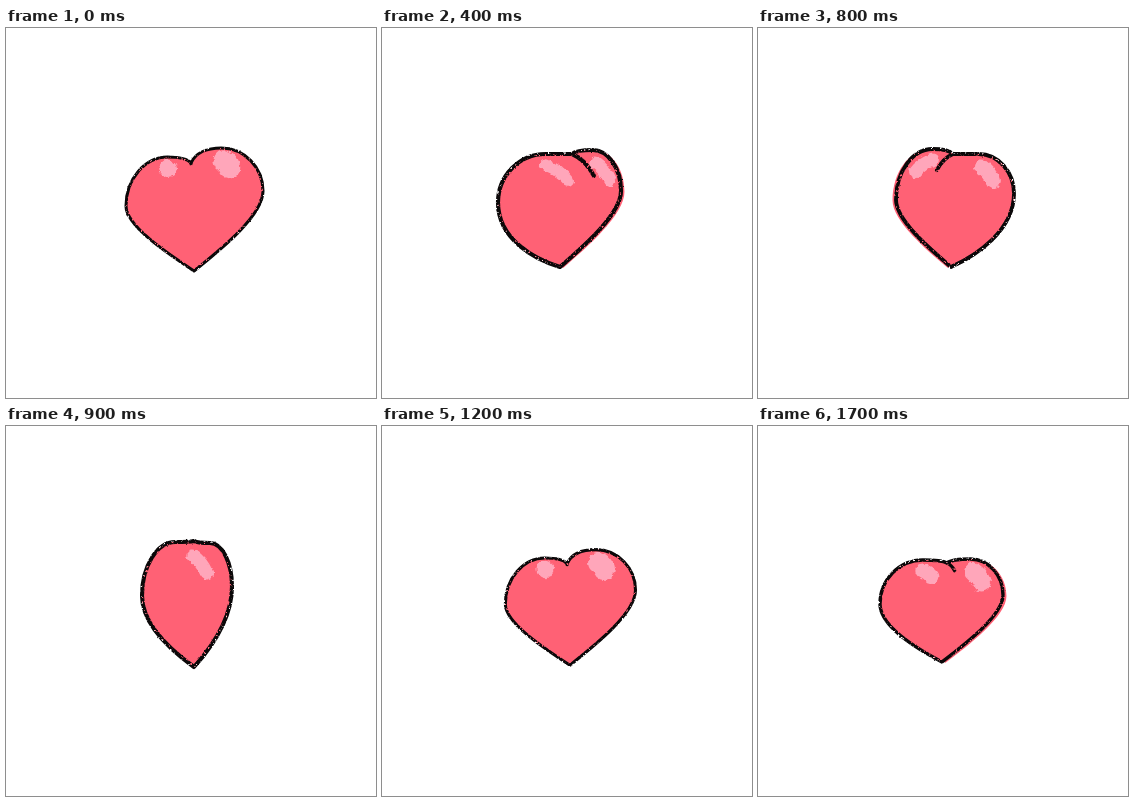
Write an HTML page that moves like this. It is 370 px wide and 370 px high and loops after 1.8 s.

```html
<!DOCTYPE html>
<html lang="en">
<head>
<meta charset="utf-8">
<title>Turning heart</title>
<style>
html, body { margin: 0; width: 100%; height: 100%; overflow: hidden; background: #fff; }
svg { display: block; width: 100vw; height: 100vh; }
path { stroke-linecap: round; stroke-linejoin: round; }
</style>
</head>
<body>
<svg viewBox="0 0 370 370">
  <defs>
    <clipPath id="inside"><path id="clip"/></clipPath>
    <filter id="ink" filterUnits="userSpaceOnUse" x="0" y="0" width="370" height="370" color-interpolation-filters="sRGB">
      <feTurbulence class="noise" type="fractalNoise" baseFrequency=".45" numOctaves="2" result="n"/>
      <feDisplacementMap in="SourceGraphic" in2="n" scale="1.8" xChannelSelector="R" yChannelSelector="G" result="d"/>
      <feColorMatrix in="n" values="0 0 0 0 0  0 0 0 0 0  0 0 0 0 0  0 0 0 7 -1.8" result="g"/>
      <feComposite in="d" in2="g" operator="in"/>
    </filter>
    <filter id="chalk" filterUnits="userSpaceOnUse" x="0" y="0" width="370" height="370" color-interpolation-filters="sRGB">
      <feTurbulence class="noise" type="fractalNoise" baseFrequency=".2" numOctaves="2" result="n"/>
      <feDisplacementMap in="SourceGraphic" in2="n" scale="5" xChannelSelector="R" yChannelSelector="G"/>
      <feGaussianBlur stdDeviation=".7"/>
    </filter>
  </defs>
  <g fill="#ff6175">
    <path id="body"/>
    <path id="spill"/>
  </g>
  <g clip-path="url(#inside)">
    <g filter="url(#chalk)" fill="none" stroke="#ffa6ba">
      <path id="shineL"/>
      <path id="shineR"/>
    </g>
  </g>
  <g id="ink-lines" filter="url(#ink)" fill="none" stroke="#0b0809">
    <path id="line"/>
    <path id="crease"/>
  </g>
</svg>
<script>
const STEP = 100, PHASES = 6, MID = 187;
const el = id => document.getElementById(id);
const mix = (a, b, k = .5) => a.map((v, i) => v + (b[i] - v) * k);

// x of notch, tip, left, right; y of notch, tip, left top, right top; depth of the fold
const front = [185, 188, 120, 257, 135, 243, 129, 120, 1];
const heavy = [190, 178, 116, 239, 126, 239, 126, 122, 23];
const back  = [183, 189, 116, 255, 132, 242, 128, 118, 15];
const edge  = [188, 188, 136, 226, 115, 241, 116, 117, 22];
const swing = [179, 181, 118, 236, 126, 239, 126, 121, 17];
const away  = [188, 189, 139, 246, 133, 233, 131, 131, 13];
const near  = [189, 184, 122, 245, 137, 236, 134, 133, 8];

const flip = ([nx, tx, l, r, ny, ty, tl, tr, fold]) =>
  [2 * MID - nx, 2 * MID - tx, 2 * MID - r, 2 * MID - l, ny, ty, tr, tl, fold];

const fit = (p, sx, sy, dy = 0) => p.map((v, i) =>
  i < 4 ? MID + (v - MID) * sx : i < 8 ? 180 + (v - 180) * sy + dy : v);

// Three half turns of six poses
const small = fit(front, .95, .94);
const poses = [
  front, mix(front, flip(heavy)), flip(heavy), flip(edge), heavy, mix(heavy, back),
  back, mix(back, flip(swing)), flip(swing), edge, mix(heavy, swing), swing,
  small, mix(small, away), away, fit(edge, .9, .85, 6), fit(heavy, .94, .88, 4), near
];

const at = (...p) => p.map(v => v.toFixed(2)).join(" ");

// One side of the heart: top of the lobe, widest point, and the handles around them
function side(nx, ny, tx, ty, x, top, reach, drop, bulge) {
  const cx = nx + (x - nx) * reach, cy = top + (ty - top) * drop, h = ty - cy;
  return {
    cx,
    pts: [
      [nx, ny],
      [nx + (cx - nx) * .15, ny + (top - ny) * .7], [cx - (cx - nx) * .45, top], [cx, top],
      [cx + (x - cx) * .55, top], [x, cy - (cy - top) * .55], [x, cy],
      [x, cy + h * (.3 + .3 * bulge)], [tx + (x - tx) * .4, ty - h * (.28 - .18 * bulge)], [tx, ty]
    ]
  };
}

const curve = pts => pts.slice(1).map((p, i) => (i % 3 ? " " : "C") + at(...p)).join("");

function shine(id, x, y, dx, dy, w) {
  el(id).setAttribute("d", `M${at(x, y)}q${at(dx * .65, dy * .35, dx, dy)}`);
  el(id).setAttribute("stroke-width", w);
}

function draw(n) {
  const [nx, tx, left, right, ny, ty, topL, topR, fold] = poses[n];
  const turn = Math.PI * (n % PHASES) / PHASES;
  const lean = -Math.sin(2 * turn);
  const show = Math.min(1, 2 * Math.abs(Math.cos(turn)));
  const bulge = s => fold / 23 * Math.max(0, .4 + .6 * lean * s);

  const L = side(nx, ny, tx, ty, left, topL, .36, .43, bulge(1));
  const R = side(nx, ny, tx, ty, right, topR, .42, .35, bulge(-1));
  const d = `M${at(nx, ny)}${curve(L.pts)}${curve(R.pts.reverse())}Z`;
  for (const id of ["body", "spill", "line", "clip"]) el(id).setAttribute("d", d);
  el("spill").setAttribute("transform", `translate(${4 * lean} ${Math.abs(lean)})`);

  const dx = fold * lean * 1.1, dy = fold * show * .95;
  el("crease").setAttribute("d", `M${at(nx, ny)}q${at(dx * .6, dy * .25, dx, dy)}`);
  el("ink-lines").setAttribute("stroke-width", 3 + fold * .05);

  const way = lean < -.1 ? -1 : 1, len = 6 + fold * .5;
  shine("shineL", L.cx, topL + 11, fold * way, fold * .7, (17 - fold * .25) * show);
  shine("shineR", R.cx + 3 - 20 * (1 - show), topR + 13, len * .8, len, 22 - fold * .4);
  document.querySelectorAll(".noise").forEach(t => t.setAttribute("seed", n + 1));
}

let shown = -1;
function tick() {
  const n = Math.floor(performance.now() / STEP) % poses.length;
  if (n !== shown) draw(shown = n);
  requestAnimationFrame(tick);
}
tick();
</script>
</body>
</html>
```
